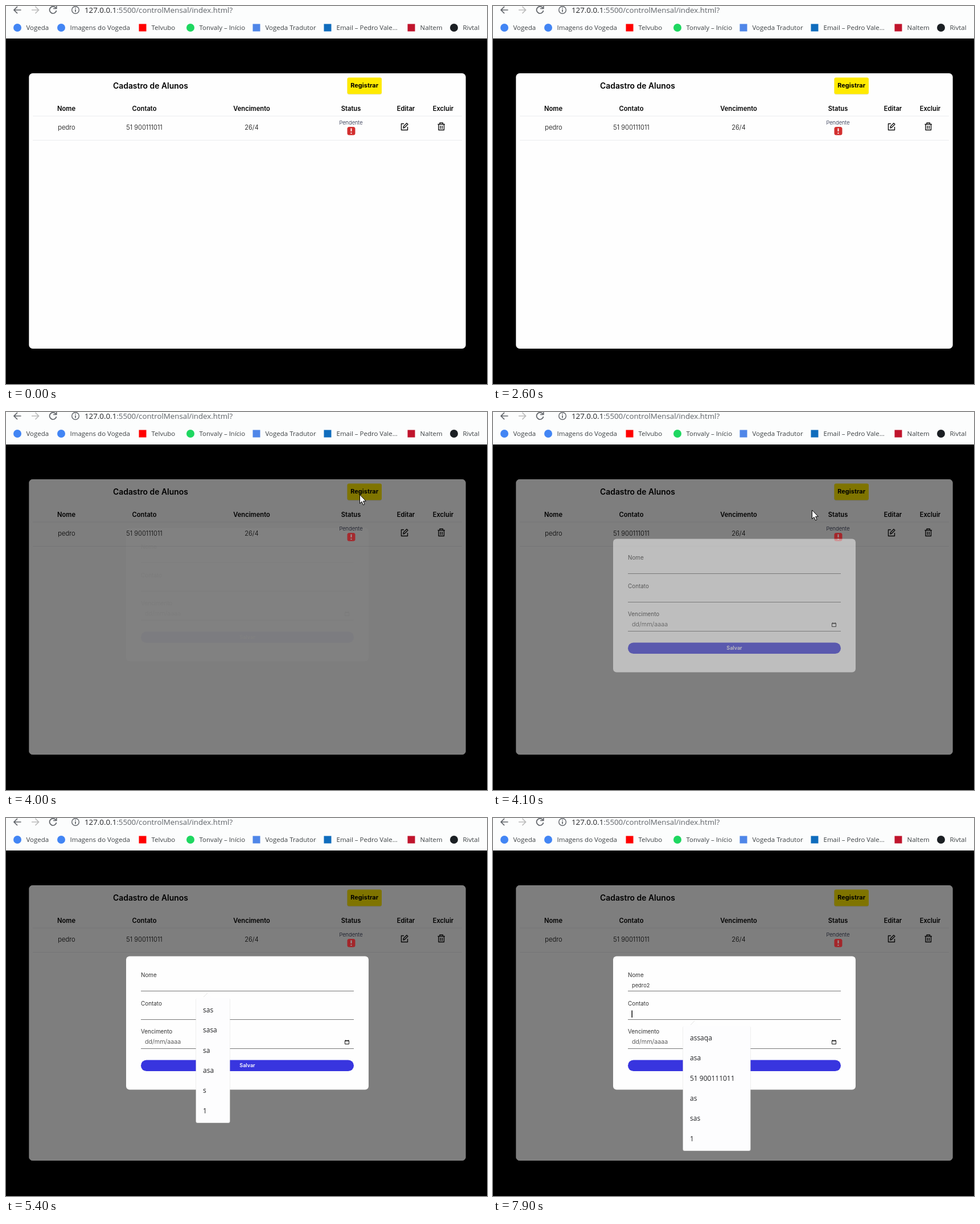
These frames come from a looping animation (845 px wide and 663 px high, 8000 ms). An HTML page:

```html
<!DOCTYPE html>
<html lang="pt-BR">
<head>
<meta charset="utf-8">
<title>Cadastro de Alunos</title>
<style>
  html, body { margin: 0; width: 100%; height: 100%; overflow: hidden; background: #000; }
  svg { display: block; font-family: Inter, sans-serif; }
  .ui { font-family: "Open Sans", sans-serif; }
  .mid { text-anchor: middle; }
  .head { font-size: 11.2px; font-weight: 600; text-anchor: middle; }
  .cell { font-size: 11.2px; font-weight: 300; text-anchor: middle; }
  .label { font-size: 9.9px; fill: #333; }
  .icon { fill: none; stroke: #111; stroke-width: 1.4; stroke-linejoin: round; }
  .nav { fill: none; stroke: #5f6368; stroke-width: 1.7; }
</style>
</head>
<body>
<svg width="845" height="663" viewBox="0 0 845 663">
  <rect width="845" height="663"/>

  <g id="browser" class="ui" font-size="11.5" fill="#3c4043">
    <rect width="845" height="57" fill="#fcfdfd"/>
    <path class="nav" d="M26.5 7H14M20 1L14 7L20 13"/>
    <path class="nav" style="stroke:#bbb" d="M45 7H57.5M51.5 1L57.5 7L51.5 13"/>
    <path class="nav" d="M87.5 3.5A6 6 0 1 0 88.5 8M88.7 -1V4.5H83"/>
    <circle class="nav" cx="122" cy="7" r="6.3" style="stroke-width:1.4"/>
    <path class="nav" d="M122 6V10.5M122 3V4.6"/>
    <text x="138" y="11.5" font-size="13.3" fill="#202124">127.0.0.1<tspan fill="#5f6368">:5500/controlMensal/index.html?</tspan></text>
  </g>

  <rect x="40.3" y="118" width="767.4" height="483" rx="6.5" fill="#fefefe"/>
  <text x="188" y="144.5" font-size="13.9" font-weight="600">Cadastro de Alunos</text>
  <rect x="599.5" y="127" width="60.5" height="28.5" rx="3" fill="#e4e4e4"/>
  <rect id="button" x="599.5" y="125.5" width="60.5" height="29" rx="3"/>
  <text id="buttonText" class="mid" x="629.7" y="143" font-size="11" font-weight="700">Registrar</text>
  <g class="head">
    <text x="106" y="184">Nome</text>
    <text x="243" y="184">Contato</text>
    <text x="431.5" y="184">Vencimento</text>
    <text x="606" y="184">Status</text>
    <text x="702.5" y="184">Editar</text>
    <text x="768" y="184">Excluir</text>
  </g>
  <path d="M47 193H801M47 235.5H801" stroke="#ebecee"/>
  <g class="cell">
    <text x="106.5" y="217">pedro</text>
    <text x="243" y="217">51 900111011</text>
    <text x="431.5" y="217">26/4</text>
    <text x="606" y="208" fill="#1c2340" style="font-size:9.3px">Pendente</text>
  </g>
  <clipPath id="selectionClip"><rect id="selectionArea" x="425" y="206" height="16"/></clipPath>
  <g clip-path="url(#selectionClip)">
    <rect x="425" y="206" width="19" height="16" fill="#3390ff"/>
    <text class="cell" x="431.5" y="217" fill="#fff">26/4</text>
  </g>
  <g class="icon">
    <path d="M699 206.5H694.5V217.5H705.5V212"/>
    <path d="M698 214L698.5 211L704 205.5L706 207.5L700.5 213Z"/>
    <path d="M758.5 207.5H771M762 207V205H767.5V207M760 207.5V217.5H769.5V207.5M763.2 210V215.5M766.3 210V215.5"/>
  </g>

  <rect id="overlay" x="40" y="118" width="768" height="483" rx="6.5" opacity=".5"/>
  <rect id="badge" x="599.5" y="212" width="14" height="14.5" rx="3.5"/>
  <path id="badgeMark" d="M606.5 214.5V220M606.5 222V224" stroke-width="2"/>

  <g id="modal">
    <rect x="211" y="242.5" width="426" height="234" rx="6" fill="#fefefe"/>
    <g class="label">
      <text x="237" y="279">Nome</text>
      <text x="237" y="329">Contato</text>
      <text x="237" y="378">Vencimento</text>
      <text x="244" y="396" style="font-size:10.8px;font-weight:300">dd/mm/aaaa</text>
      <text id="typed" x="244" y="297" style="font-size:9.3px"></text>
    </g>
    <path d="M237 303.5H611M237 353.5H611M237 404.5H611" stroke="#777"/>
    <path d="M595.5 390.5H602.5V396.5H595.5ZM595.5 391H602.5M597 389V390M601 389V390" fill="none" stroke="#111"/>
    <rect x="237" y="424.5" width="374" height="19.5" rx="9.75" fill="#3835df"/>
    <text class="mid" x="424" y="437" font-size="9" font-weight="600" fill="#fff">Salvar</text>
    <rect id="caret" width="1.4" height="12.5"/>
  </g>
  <g id="menus" class="ui" font-size="12" fill="#202124"></g>

  <g id="arrow" fill="#fff" stroke="#000">
    <path d="M.5 .5V16L4 12.7L6.5 18.5L9 17.4L6.6 11.8H11.3Z"/>
  </g>
  <g id="hand" fill="#fff" stroke="#000" stroke-linejoin="round">
    <path d="M-1.5 1.5Q0 -1.5 1.5 1.5V8Q3 6.5 4.5 8.2Q6 7 7.3 9Q9.5 8 10 11V16Q9.5 18 8.5 19.5V22.5H-.5V20.5L-6 13.5Q-6.5 11 -4 11.5L-1.5 14Z"/>
    <path d="M1.5 8V11.5M4.5 8.5V11.5M7.3 9.5V12"/>
  </g>
</svg>
<script>
const LOOP = 8000, STEP = 100;
const $ = id => document.getElementById(id);
const clamp = v => Math.min(1, Math.max(0, v));
const show = (el, on) => el.setAttribute('visibility', on ? 'visible' : 'hidden');
const set = (el, attrs) => Object.entries(attrs).forEach(([k, v]) => el.setAttribute(k, v));

// Icon centre, label, icon colour, and whether the icon is round
const bookmarks = [
  [20, 'Vogeda', '#4285f4', true], [97, 'Imagens do Vogeda', '#4285f4', true],
  [240, 'Telvubo', '#f00', false], [324, 'Tonvaly – Início', '#1ed760', true],
  [440, 'Vogeda Tradutor', '#4f86e8', false], [565, 'Email – Pedro Vale...', '#0f6cbd', false],
  [712, 'Naltem', '#c0142c', false], [787, 'Rivtal', '#1b1f23', true]
];
$('browser').insertAdjacentHTML('beforeend', bookmarks.map(([x, label, color, round]) => {
  const r = round ? 7 : 6.5;
  return `<rect x="${x - r}" y="${38 - r}" width="${2 * r}" height="${2 * r}" rx="${round ? r : 0}" fill="${color}"/>
    <text x="${x + 15.5}" y="42">${label}</text>`;
}).join(''));

function addMenu(top, width, items) {
  const rows = items.map((s, i) => `<text x="346" y="${top + 25 + i * 35.3}">${s}</text>`).join('');
  $('menus').insertAdjacentHTML('beforeend', `<g>
    <rect x="333.5" y="${top}" width="${width + 1}" height="219" rx="3" fill="#ddd"/>
    <rect x="334" y="${top - 1}" width="${width}" height="219" rx="3" fill="#fdfdfe"/>
    <path d="M346 ${top - 1}L354 ${top - 9}L362 ${top - 1}" fill="#fdfdfe"/>
    <path d="M347 ${top - 2}L354 ${top - 9}" stroke="#e4e4e4"/>${rows}</g>`);
  return $('menus').lastElementChild;
}
const nameMenu = addMenu(316, 59, ['sas', 'sasa', 'sa', 'asa', 's', '1']);
const contactMenu = addMenu(365, 118, ['assaqa', 'asa', '51 900111011', 'as', 'sas', '1']);

// Each pointer stroke: points of [time, x, y]
const strokes = [
  [[200, 330, 0], [600, 270, 110], [1000, 216, 213], [1300, 423, 213]],
  [[2800, 440, 213], [3100, 560, 175], [3400, 621, 145], [4000, 621, 145],
   [4100, 560, 172], [4200, 483, 210], [4300, 425, 250], [4600, 350, 292]]
];
function pointerAt(t) {
  const path = strokes.find(p => t >= p[0][0] && t < p.at(-1)[0]);
  if (!path) return null;
  const i = path.findIndex(p => p[0] > t), [t0, x0, y0] = path[i - 1], [t1, x1, y1] = path[i];
  const k = (t - t0) / (t1 - t0);
  return [x0 + (x1 - x0) * k, y0 + (y1 - y0) * k];
}

const keyTimes = [6100, 6300, 6400, 6600, 6700, 7200];
const fade = (t, from, to) => t >= from && t < to ? clamp((t - from + STEP) / 300) : 0;

// The caret blinks every half second, starting afresh on each click or key
function caretOn(t) {
  const last = [4900, ...keyTimes, 7500].filter(k => k <= t).at(-1);
  return last !== undefined && (t - last) % 1000 < 500;
}

function draw(t) {
  const open = t >= 4000;
  const hover = open ? 0 : clamp((t - 3100) / 300);
  const ink = 255 * hover;
  set($('button'), { fill: `rgb(255,234,${143 * hover})` });
  set($('buttonText'), { fill: `rgb(${ink},${ink},${ink})` });

  const selecting = t >= 1700 && t < 2300;
  set($('selectionArea'), { width: selecting ? (t < 1800 ? 7 : 19) : 0 });

  show($('overlay'), open);
  set($('badge'), { fill: open ? '#a3262a' : '#d32f2f' });
  set($('badgeMark'), { stroke: open ? '#999' : '#fff' });

  const entry = open ? [.02, .5, .87][(t - 4000) / STEP] ?? 1 : 0;
  set($('modal'), { opacity: entry, transform: `translate(0 ${-40 * (1 - entry)})` });

  const typed = $('typed');
  typed.textContent = 'pedro2'.slice(0, keyTimes.filter(k => k <= t).length);
  const inContact = t >= 7500;
  const caretX = inContact || !typed.textContent ? 243.5 : 244.5 + typed.getComputedTextLength();
  set($('caret'), { x: caretX, y: inContact ? 337.5 : 288, opacity: caretOn(t) ? 1 : 0 });

  set(nameMenu, { opacity: fade(t, 5000, 6100) });
  set(contactMenu, { opacity: fade(t, 7500, LOOP) });

  const pos = pointerAt(t), onButton = hover > 0;
  show($('arrow'), pos && !onButton);
  // The hand rests on the button until the click
  show($('hand'), pos && onButton);
  if (pos) {
    set($('arrow'), { transform: `translate(${pos[0]} ${pos[1] - .5})` });
    set($('hand'), { transform: `translate(${pos[0] + 1} ${pos[1]})` });
  }
}

function tick() {
  draw(Math.floor(performance.now() % LOOP / STEP) * STEP);
  requestAnimationFrame(tick);
}
tick();
</script>
</body>
</html>
```
